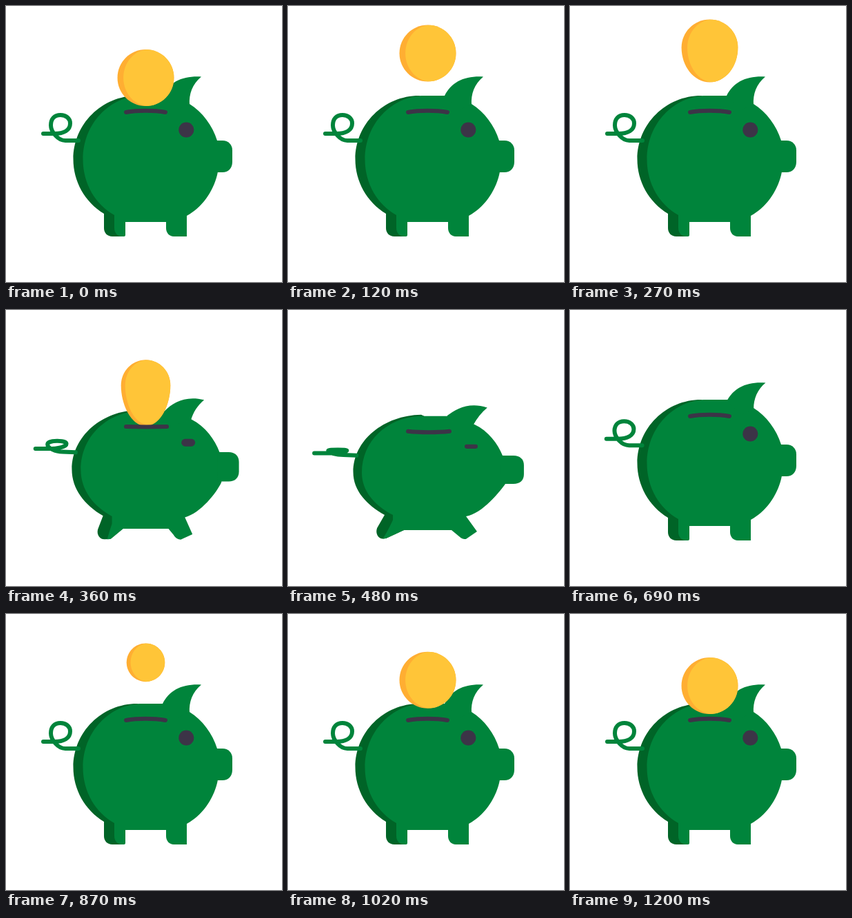
These frames come from a looping animation (400 px wide and 400 px high, 8000 ms). An HTML page:

```html
<!DOCTYPE html>
<html lang="en">
<head>
<meta charset="utf-8">
<title>Piggy bank</title>
<style>
  html, body { margin: 0; width: 100%; height: 100%; overflow: hidden; background: #fff; }
  svg { display: block; width: 100%; height: 100%; }
</style>
</head>
<body>
<svg viewBox="0 0 400 400">
  <clipPath id="aboveSlot"><rect id="mask" width="400" height="400"/></clipPath>
  <clipPath id="insideCoin"><path id="bound"/></clipPath>
  <path id="back" fill="#006427"/>
  <path id="body" fill="#00843b"/>
  <path id="snout" fill="#00843b"/>
  <path id="ear" fill="#00843b"/>
  <path id="tail" fill="none" stroke="#00843b" stroke-width="6" stroke-linecap="round" stroke-linejoin="round"/>
  <rect id="eye" fill="#3c3447"/>
  <g clip-path="url(#aboveSlot)">
    <path id="rim" fill="#ffae32"/>
    <path id="face" fill="#ffc538" clip-path="url(#insideCoin)"/>
  </g>
  <path id="slot" fill="none" stroke="#3c3447" stroke-width="6" stroke-linecap="round"/>
</svg>
<script>
const LOOP = 8000;
const SQUASHED = 0.7; // squash amount at which the second shape of each pair is drawn
const $ = id => document.getElementById(id);

// Each part: relaxed shape, squashed shape.
const SHAPES = {
  back: [
    'M190 130 C139 130 97.5 171 97.5 222 C97.5 254 114 284 142 301 L142 322 C142 329 147 334 154 334 L171 334 L173 313 L210 300 L210 136 Z',
    'M193 152 C139 153 94.5 189 94.5 235 C94.5 262 114 282 140 297 L129 316 C126 324 131 332 138 331.5 L142 331 L168 319 L210 300 L210 160 Z'
  ],
  body: [
    'M198 130 C150 130 111.5 171 111.5 222 C111.5 258 130 288 157 303 L157 322 C157 329 162 334 168 334 L171 334 Q173 334 173 332 L173 313 L232 313 L232 322 C232 329 237 334 243 334 L262 334 L262 304 C284 292 300 269.5 306 245 C310 228 310 212 306 195 C299.4 173.4 285 154 266 142 L240 130 Z',
    'M190 154 C143 157 107 190 107 236 C107 262 125 283 152 297 L152 304 C148 313 141 326 137 331.5 L141 331 Q142 331 144 330 L168 319 L237 319 L248 328 C252 332 255 332 258 332 L274 321 L258 299 C282 295 308 262 315 252 C316 240 316 225 311 211 C304 194 291 176 270 166 L240 154 Z'
  ],
  snout: [
    'M303 195 L314 195 C322 195 328 201 328 209 L328 226 C328 235 322 241 314 241 L303 241 Z',
    'M308 211 L327 211 C336 211 342 216 342 225 L342 238 C342 247 336 252 327 252 L308 252 Z'
  ],
  ear: [
    'M227 130 C237 110 256 101 283 102.5 C270 113 265 128 266 143 L250 150 L227 132 Z',
    'M231 154 C244 145 262 134 289 143 C281 150 274 158 269 167 L250 172 L231 156 Z'
  ],
  tail: [
    'M54 185 L70 185 C84 185 93 180 93 170 C93 163 87 158 79 158 C70 158 65 164 65 173 C65 182 75 195 86 195 L105 195',
    'M37.5 208.5 L57 208.5 C72 208.5 85 206.5 85 205 C85 204.3 80 204.3 72 204.3 C64 204.3 58 204.3 58 205 C58 208 70 210.5 80 210.5 L99 211.5'
  ],
  slot: [
    'M174 154 C190 151 215 151 231 154',
    'M174 176 C190 178 218 178 234 176'
  ]
};

const clamp = v => Math.max(0, Math.min(1, v));
const span = (t, a, b) => clamp((t - a) / (b - a));
const mix = (a, b, k) => a + (b - a) * k;
const sine = u => (1 - Math.cos(Math.PI * u)) / 2;

function morph([from, to], k) {
  const ends = to.match(/-?[\d.]+/g);
  let i = 0;
  return from.replace(/-?[\d.]+/g, n => mix(+n, +ends[i++], k).toFixed(2));
}

function squash(t, end, power) {
  return t < 420 ? sine(span(t, 305, 420)) : (1 - span(t, 420, end)) ** power;
}

function set(id, attrs) {
  for (const name in attrs) $(id).setAttribute(name, attrs[name]);
}

// Egg outline: round top, side anchors at y = mid, lower half shaped by hang and foot.
function egg(x, w, top, mid, low, hang, foot) {
  const up = mid - 0.5523 * (mid - top), down = mid + hang * (low - mid);
  return `M${x} ${top}C${x + 0.5523 * w} ${top} ${x + w} ${up} ${x + w} ${mid}` +
    `C${x + w} ${down} ${x + foot * w} ${low} ${x} ${low}` +
    `C${x - foot * w} ${low} ${x - w} ${down} ${x - w} ${mid}` +
    `C${x - w} ${up} ${x - 0.5523 * w} ${top} ${x} ${top}Z`;
}

function coin(t) {
  const c = { w: 41, top: 0, mid: 104, low: 0, hang: 0.5523, foot: 0.5523, edge: 8.6, lift: 0 };
  if (t > 180 && t < 810) {
    // falls and is squeezed through the slot
    const q = (t - 180) / 180, e = q ** 4, n = Math.min(1, e);
    c.w = Math.max(4, 41 - 5 * q ** 6);
    c.top = 16 + 55 * e;
    c.mid = 57 + 51 * e;
    c.low = 98 + 69 * q ** 2.5;
    c.hang = mix(0.5523, 0.457, n);
    c.foot = mix(0.5523, 0.61, n);
    c.edge = mix(8.6, 6, n);
    c.lift = 2 * n;
    c.gone = t >= 425;
    return c;
  }
  if (t <= 180) {
    c.mid = mix(104, 57, sine(t / 180));
  } else if (t < 900) {
    const size = span(t, 810, 900);
    c.w *= size;
    c.edge *= size;
    c.mid = 98.5 - 41.5 * size;
    c.gone = size === 0;
  } else {
    c.mid = t < 1080 ? mix(57, 108, sine(span(t, 900, 1080)))
                     : mix(108, 104, sine(span(t, 1080, 1200)));
  }
  c.top = c.mid - c.w;
  c.low = c.mid + c.w;
  return c;
}

function draw(t) {
  const k = squash(t, 690, 1.42) / SQUASHED;
  const late = squash(t, 780, 2.13) / SQUASHED;
  for (const id in SHAPES) {
    const lag = id === 'ear' || id === 'tail';
    set(id, { d: morph(SHAPES[id], lag ? late : k) });
  }

  const rx = mix(11, 9.5, k), ry = Math.max(0.3, mix(11, 3, k));
  set('eye', {
    x: mix(261.3, 265.5, k) - rx, y: mix(179.5, 198, k) - ry,
    width: 2 * rx, height: 2 * ry, rx: Math.min(rx, ry), ry: Math.min(rx, ry)
  });

  set('mask', { height: mix(152, 177, k) });
  const c = coin(t);
  const outline = (dx, lift) => c.gone ? '' :
    egg(202.5 + dx, c.w - dx, c.top, c.mid, c.low - lift, c.hang, c.foot);
  const rim = outline(0, 0);
  set('rim', { d: rim });
  set('bound', { d: rim });
  set('face', { d: outline(c.edge / 2, c.lift) });
}

const start = performance.now();
function tick() {
  draw((performance.now() - start) % LOOP);
  requestAnimationFrame(tick);
}
tick();
</script>
</body>
</html>
```
